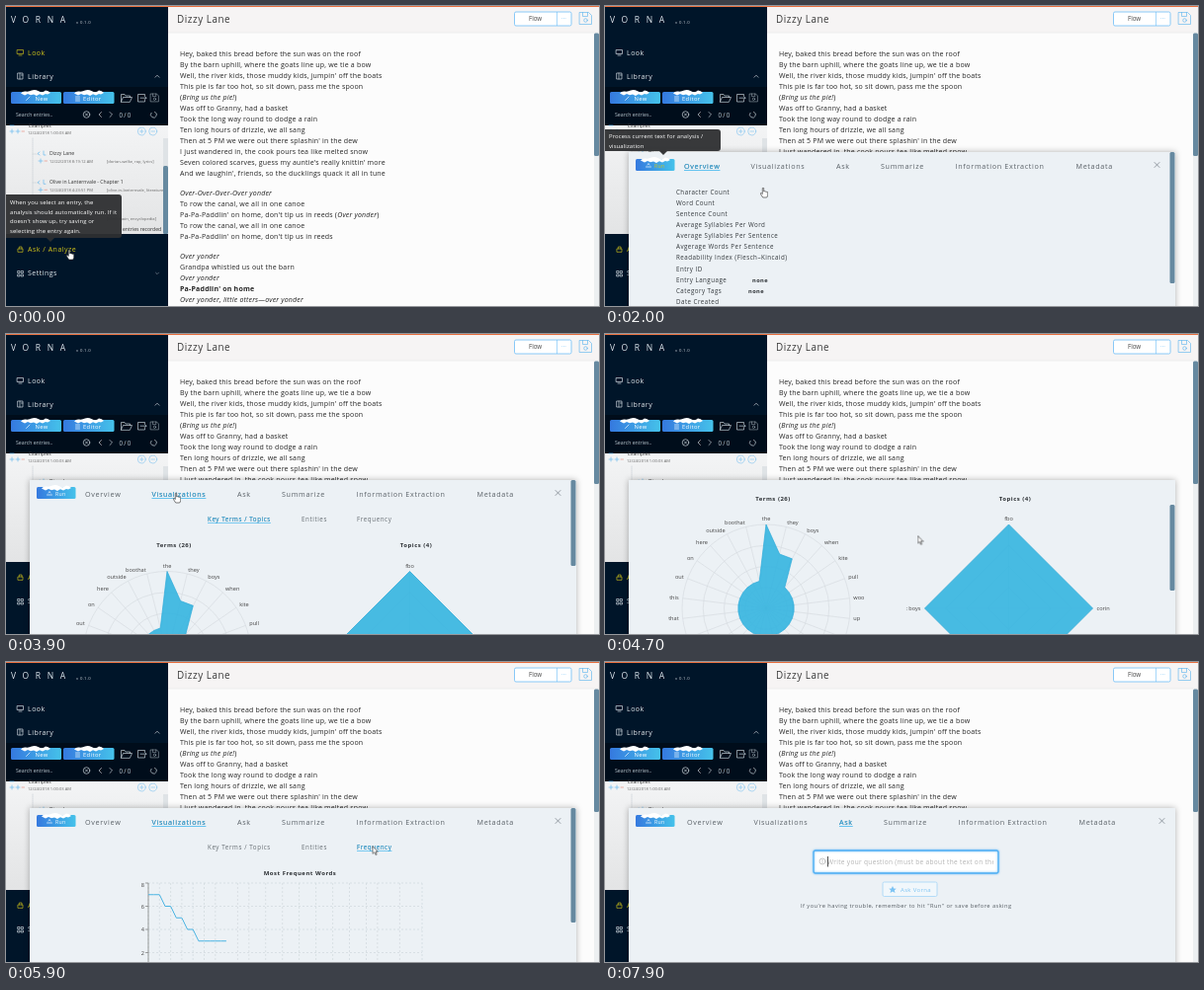
Animation of 600x304 px, one loop 8 s. Source, as an HTML page:

```html
<!DOCTYPE html>
<html lang="en">
<head>
<meta charset="utf-8">
<title>Text analysis demo</title>
<style>
html,body{margin:0;width:100%;height:100%;overflow:hidden;background:#fcfcfc}
svg{display:block;width:600px;height:304px;font-family:"Open Sans","Noto Sans",sans-serif}
text{white-space:pre}
.ln{fill:none;stroke-width:.65;stroke-linecap:round;stroke-linejoin:round}
.w{stroke:#d5dde4}.y{stroke:#d3c51a}.b{stroke:#62b6ef}.r{stroke:#e58a7a}
.menu{font-size:7px;letter-spacing:.5px;fill:#e6eaee}
.yel{fill:#d3c51a}
.lyr{font-size:7px;letter-spacing:.2px;fill:#242424}
.lyr .i{font-style:italic}
.lyr .s{font-weight:700}
.tab{font-size:7.2px;letter-spacing:.67px;fill:#5a6167}
.sub{font-size:6.2px;letter-spacing:.6px;fill:#666d73}
.act{fill:#2fb1ee;text-decoration:underline}
.row{font-size:6.2px;letter-spacing:.47px;fill:#33383c}
.val{font-size:5.7px;letter-spacing:.4px;font-weight:700;fill:#2c3034}
.head{font-size:6px;letter-spacing:.5px;font-weight:700;fill:#2c3034;text-anchor:middle}
.lab{font-size:5.6px;fill:#444}
.m{text-anchor:middle}.e{text-anchor:end}
.tree{font-size:5.1px;fill:#333}
.tiny{font-size:4.1px;fill:#666}
.tip path{fill:#2e2f31;fill-opacity:.95}
.tip g{font-size:5.9px;letter-spacing:.12px;fill:#fff}

/* one shared 8 s clock; 1% is 80 ms */
.a{animation:8s linear infinite both}
.look{animation-name:look}
.tip0{animation-name:tip0}
.tip1{animation-name:tip1}
.hot{animation-name:hot}
.draw{animation-name:draw}
.msg{animation-name:msg}
.none{animation-name:none-v}
.full{animation-name:full}
.over{animation-name:over}
.vis{animation-name:vis}
.ask{animation-name:ask}
.terms{animation-name:terms}
.ents{animation-name:ents}
.freq{animation-name:freq}
.dots{animation-name:dots}
.line{animation-name:line;stroke-dasharray:1}
.focus{animation-name:focus}
.scroll{animation-name:scroll}
.thumb{animation-name:thumb}
.nudge{animation-name:nudge}
.nudge2{animation-name:nudge2}
.move{animation-name:move;animation-timing-function:ease-in-out}
.hand{animation-name:hand}
.arrow{animation-name:arrow}
@keyframes look{0%,3.7%{fill:#d3c51a;stroke:#d3c51a}5%,100%{fill:#e6eaee;stroke:#e6eaee}}
@keyframes tip0{0%,6%{opacity:1}8.5%,100%{opacity:0}}
@keyframes tip1{0%,15%{opacity:0}17%,25.6%{opacity:1}27.5%,100%{opacity:0}}
@keyframes hot{0%,14.9%{fill:#fff}15%,25.6%{fill:#d3c51a}27%,100%{fill:#fff}}
@keyframes draw{0%,4.5%{transform:translateY(170px);animation-timing-function:cubic-bezier(.2,.6,.3,1)}8.75%,100%{transform:none}}
@keyframes msg{0%,26.2%{opacity:0}28.5%,38.75%{opacity:1}41.25%,100%{opacity:0}}
@keyframes none-v{0%,36.2%{opacity:1}36.21%,100%{opacity:0}}
@keyframes full{0%,36.2%{opacity:0}36.21%,100%{opacity:1}}
@keyframes over{0%,48.74%{opacity:1}48.75%,100%{opacity:0}}
@keyframes vis{0%,48.74%{opacity:0}48.75%,89.99%{opacity:1}90%,100%{opacity:0}}
@keyframes ask{0%,89.99%{opacity:0}90%,100%{opacity:1}}
@keyframes terms{0%,48.74%{opacity:0}48.75%,64.99%{opacity:1}65%,100%{opacity:0}}
@keyframes ents{0%,64.99%{opacity:0}65%,71.24%{opacity:1}71.25%,100%{opacity:0}}
@keyframes freq{0%,71.24%{opacity:0}71.25%,89.99%{opacity:1}90%,100%{opacity:0}}
@keyframes dots{0%,78.7%{opacity:0}78.8%,100%{opacity:1}}
@keyframes line{0%,71.25%{stroke-dashoffset:1}78.7%,100%{stroke-dashoffset:0}}
@keyframes focus{0%,95.5%{opacity:0}97%,100%{opacity:1}}
@keyframes scroll{0%,53.75%{transform:none}57.5%,61.25%{transform:translateY(-47.5px)}63.75%,76.25%{transform:none}79%,85%{transform:translateY(-55.5px)}87.5%,100%{transform:none}}
@keyframes thumb{0%,48.74%{y:148px;height:133px}48.75%,53.75%{y:148px;height:87px}57.5%,61.25%{y:173px;height:87px}63.75%,64.99%{y:148px;height:87px}65%,71.24%{y:148px;height:51px}71.25%,76.25%{y:148px;height:116px}79%,85%{y:188px;height:116px}87.5%,89.99%{y:148px;height:116px}90%,100%{y:148px;height:0}}
@keyframes nudge{0%,89.99%{transform:none}90%,100%{transform:translateX(3px)}}
@keyframes nudge2{0%,89.99%{transform:none}90%,100%{transform:translateX(5px)}}
@keyframes move{0%,5%{transform:translate(64px,247px)}13%,21.25%{transform:translate(50px,162px)}25%{transform:translate(160px,184px)}30%{transform:translate(200px,187px)}40%{transform:translate(225px,186px)}46.5%,49%{transform:translate(172px,161px)}54%,61%{transform:translate(316.5px,204.5px)}64%,67%{transform:translate(306.5px,181.5px)}70.5%,72%{transform:translate(368px,187px)}76%,86%{transform:translate(375.5px,186px)}89.5%,91.5%{transform:translate(241px,161px)}95.5%,100%{transform:translate(226px,202px)}}
@keyframes hand{0%,8%{opacity:1}8.01%,12%{opacity:0}12.01%,26%{opacity:1}26.01%,45.5%{opacity:0}45.51%,50%{opacity:1}50.01%,63.5%{opacity:0}63.51%,67.5%{opacity:1}67.51%,70%{opacity:0}70.01%,73%{opacity:1}73.01%,89%{opacity:0}89.01%,92%{opacity:1}92.01%,100%{opacity:0}}
@keyframes arrow{0%,8%{opacity:0}8.01%,12%{opacity:1}12.01%,26%{opacity:0}26.01%,45.5%{opacity:1}45.51%,50%{opacity:0}50.01%,63.5%{opacity:1}63.51%,67.5%{opacity:0}67.51%,70%{opacity:1}70.01%,73%{opacity:0}73.01%,89%{opacity:1}89.01%,92%{opacity:0}92.01%,95.5%{opacity:1}95.51%,100%{opacity:0}}
</style>
</head>
<body>
<svg viewBox="0 0 600 304">
<defs>
  <linearGradient id="btn"><stop offset="0" stop-color="#3579df"/><stop offset="1" stop-color="#45c2ea"/></linearGradient>
  <linearGradient id="pane" x2="0" y2="1"><stop offset="0" stop-color="#f3f4f5"/><stop offset="1" stop-color="#e3e4e5"/></linearGradient>
  <clipPath id="view"><path d="M24 148H577V304H24z"/></clipPath>
  <clipPath id="treeClip"><path d="M0 117H159V231H0z"/></clipPath>
  <clipPath id="inClip"><path d="M214 192H393V214H214z"/></clipPath>
  <g id="floppy"><path class="ln" d="M0 0H9L12 3V12H0zM3 0V4H8V0"/><circle class="ln" cx="6" cy="8" r="1.8"/></g>
  <path id="torn" fill="#fff" d="M0 3Q2 .5 5 1T11 0T18 .8T25 0Q28 0 30 2.5L27 4 25 3.4 22 5 19 3.8 16 5.4 13 4 10 4.8 7 3.6 4 5z"/>
</defs>

<!-- page -->
<path fill="#f6f4f4" d="M164 0H600V27H164z"/>
<path stroke="#e4e4e4" stroke-width=".6" d="M164 27H600"/>
<text x="173" y="17.3" font-size="9.9" letter-spacing=".55" fill="#3a3a3a">Dizzy Lane</text>
<rect x="514.5" y="6" width="57.5" height="14" rx="1.5" fill="#fff" stroke="#6cbdf6" stroke-width=".8"/>
<path stroke="#6cbdf6" stroke-width=".6" d="M557.5 6V20"/>
<text x="529" y="15.4" font-size="6.2" fill="#444">Flow</text>
<text x="562" y="14" font-size="6" fill="#6cbdf6">···</text>
<use href="#floppy" class="b" x="580.5" y="6.5"/>
<g id="lyrics" class="lyr"></g>
<path fill="#eceff1" d="M595 27.5H600V304H595z"/>
<rect x="595" y="27.5" width="5" height="124.5" rx="1.5" fill="#6689a0"/>
<g class="a msg">
  <rect x="257" y="5" width="86" height="19" rx="2.5" fill="#f3f3f3" stroke="#e3e3e3" stroke-width=".6"/>
  <circle cx="268" cy="14.5" r="2.7" fill="none" stroke="#888"/>
  <text x="276" y="17" font-size="6" letter-spacing=".1" fill="#777">Outputting analysis..</text>
</g>

<!-- sidebar -->
<path fill="#001529" d="M0 0H164V304H0z"/>
<path fill="#000d1b" d="M0 82H164V121H0z"/>
<text x="5" y="17.3" font-size="8.5" letter-spacing="6.6" fill="#e3eaf0">VORNA</text>
<text x="71" y="18" font-size="4.2" letter-spacing=".35" fill="#cfd6dc">v 0.1.0</text>
<g class="menu">
  <g class="a look">
    <path class="ln" d="M11.5 44.5H17.5V48.5H11.5zM13 50H16"/>
    <text x="22" y="49.6" stroke="none">Look</text>
  </g>
  <path class="ln w" d="M12 68H17V74H12zM14 68V74M15.5 70H17"/>
  <text x="22" y="73.6">Library</text>
  <path class="ln w" d="M151 72.2L153 70.2 155 72.2"/>
  <path class="ln y" d="M12.3 246H17V249.3H12.3zM13.3 246V244H16V246"/>
  <text class="yel" x="22" y="249.3">Ask / Analyze</text>
  <path class="ln w" d="M12 268.5H14V270.5H12zM15.5 268.5H17.5V270.5H15.5zM12 272H14V274H12zM15.5 272H17.5V274H15.5z"/>
  <text x="22" y="273.4">Settings</text>
  <path class="ln w" d="M151.5 270.2L153 271.7 154.5 270.2" opacity=".6"/>
</g>
<rect x="5" y="87" width="51" height="12" rx="1.5" fill="url(#btn)"/>
<rect x="58" y="87" width="51.5" height="12" rx="1.5" fill="url(#btn)"/>
<use href="#torn" x="15" y="85.5"/><use href="#torn" x="69" y="85.5"/>
<g fill="#fff" font-size="5.8" letter-spacing=".4">
  <text x="29.5" y="95.8">New</text><text x="78" y="95.8">Editor</text>
  <path class="ln" stroke="#fff" d="M20.5 95.5L24 92M70.5 92H74.5M70.5 94H74.5M70.5 96H74.5"/>
</g>
<path class="ln w" d="M116.5 97V89.5H120L121 91H125.5V92.5M116.5 97L118.5 92.5H127.5L125.5 97zM140.5 91V89.5H133.5V97H140.5V95.5M136 93.2H142M140.5 91.7L142 93.2 140.5 94.7"/>
<g class="w" transform="translate(146.5 89) scale(.66)"><use href="#floppy"/></g>
<text x="10" y="112.3" font-size="5.2" fill="#bcc6ce">Search entries..</text>
<g class="ln w"><circle cx="81.5" cy="110" r="3.3"/><path d="M80.3 108.8L82.7 111.2M82.7 108.8L80.3 111.2M96.5 107.5L94 110 96.5 112.5M105 107.5L107.5 110 105 112.5M147 108.3A3 3 0 1 0 150.5 107.3"/></g>
<text x="114.5" y="112.5" font-size="6.2" letter-spacing="1.2" fill="#c5ced5">0/0</text>

<!-- entry tree -->
<path fill="url(#pane)" d="M0 121H164V231H0z"/>
<g clip-path="url(#treeClip)">
  <path class="ln" stroke="#c6ced4" stroke-dasharray="1 1" d="M27 134V231M27 150H33M27 179H33M27 209H33"/>
  <text class="tree" x="23" y="122.5">Examples</text>
  <text class="tiny" x="22" y="129.7">12/24/2018 1:00:03 AM</text>
  <path class="ln b" d="M4 121H8M4 127H8M6 125V129M12 125V129M10 127H14"/>
  <path class="ln r" d="M16 127H18.5"/>
  <g id="entries"></g>
  <g class="ln b" opacity=".75"><circle cx="137.3" cy="127" r="4"/><circle cx="148.7" cy="127" r="4"/><path d="M135.5 127H139M137.3 125.2V128.8M147 127H150.5"/></g>
</g>
<path fill="#dfe3e6" d="M159 134H164V231H159z"/>
<rect x="159" y="162" width="5" height="69" rx="1.5" fill="#6689a0"/>
<g class="tip a tip0">
  <path d="M0 191H114Q117 191 117 194V232Q117 235 114 235H49L45 239 41 235H0z"/>
  <g id="tipA"></g>
</g>

<!-- drawer -->
<g class="a draw">
  <rect x="24" y="148" width="553" height="175" fill="#ecf1f5" style="filter:drop-shadow(0 0 3px rgba(0,0,0,.3))"/>
  <g clip-path="url(#view)">
    <g class="a scroll">
      <rect x="31" y="155" width="39.5" height="12" rx="1.5" fill="url(#btn)"/>
      <use href="#torn" x="36" y="153.5"/>
      <text class="a hot" x="50" y="163.5" font-size="5.2" letter-spacing=".3">Run</text>
      <path class="ln" stroke="#fff" d="M41.5 163H46.5M43 161L44 159.5 45 161"/>
      <g id="tabs" class="tab a nudge"></g>
      <path class="ln a nudge2" stroke="#66727a" d="M556 158.5L561 163.5M561 158.5L556 163.5"/>
      <g id="overview" class="a over"></g>
      <g id="subs" class="sub a vis"></g>
      <g id="terms" class="a terms"></g>
      <g id="ents" class="a ents"></g>
      <g id="freq" class="a freq"></g>
      <g class="a ask">
        <rect x="211" y="191" width="187" height="23" rx="2" fill="#fff" stroke="#a9d6f7"/>
        <rect class="a focus" x="211" y="191" width="187" height="23" rx="2" fill="none" stroke="#55b1f3" stroke-width="1.3" style="filter:drop-shadow(0 0 1px #6cbdf6)"/>
        <circle class="ln" stroke="#aaa" cx="220" cy="202" r="3"/>
        <path class="ln" stroke="#aaa" d="M220 200.5V202.3M220 203.5V203.6"/>
        <g clip-path="url(#inClip)"><text x="225" y="204.7" font-size="6.5" letter-spacing=".33" fill="#b3b3b3">Write your question (must be about the text on the page)</text></g>
        <path class="a focus" stroke="#222" stroke-width=".8" d="M225.5 197V207.5"/>
        <rect x="281" y="223" width="55" height="14.5" rx="1.5" fill="#f1f7fb" stroke="#a4d5f6" stroke-width=".8"/>
        <path fill="#7cc3f3" d="M291 227L292.2 229.5 294.8 229.7 292.8 231.3 293.5 234 291 232.6 288.5 234 289.2 231.3 287.2 229.7 289.8 229.5z"/>
        <text x="299" y="232.7" font-size="6" letter-spacing=".35" fill="#7cc3f3">Ask Vorna</text>
        <text x="198" y="249.4" font-size="5.7" letter-spacing=".46" fill="#555c62">If you're having trouble, remember to hit "Run" or save before asking</text>
      </g>
    </g>
    <rect class="a thumb" x="571.5" width="5" rx="1.5" fill="#6689a0"/>
  </g>
</g>
<g class="tip a tip1">
  <path d="M0 125H114Q117 125 117 128V144Q117 147 114 147H63L59 151 55 147H0z"/>
  <g id="tipB"></g>
</g>

<g class="a move" stroke="#222" stroke-width=".6" stroke-linejoin="round" fill="#fff">
  <path class="a arrow" d="M0 0V7.5L1.8 6 3 8.8 4.2 8.3 3 5.6H5.3z"/>
  <path class="a hand" d="M-.7 .6Q0-.4.7.6V4Q1.7 3.3 2.2 4.1 3.1 3.6 3.6 4.4 4.7 4.1 4.7 5.2V7.5Q4.5 9 3.7 10H-.3L-2.6 6.5Q-2.9 5.3-1.8 5.6L-.7 6.6z"/>
</g>
<path fill="#e8703f" d="M0 0H600V1H0z"/>
</svg>

<script>
const put = (id, html) => { document.getElementById(id).innerHTML = html; };
const txt = (x, y, s, cls = '') => `<text x="${x}" y="${y}" class="${cls}">${s}</text>`;
const lines = (x, y, step, list) => list.map((s, i) => txt(x, y + i * step, s)).join('');

// lyrics, in stanzas that start at a given height
const it = s => `<tspan class="i">${s}</tspan>`;
const row = "To row the canal, we all in one canoe";
const pad = "Pa-Pa-Paddlin' on home, don't tip us in reeds";
put('lyrics', [
  [50.8, [
    "Hey, baked this bread before the sun was on the roof",
    "By the barn uphill, where the goats line up, we tie a bow",
    "Well, the river kids, those muddy kids, jumpin' off the boats",
    "This pie is far too hot, so sit down, pass me the spoon",
    `(${it("Bring us the pie!")})`,
    "Was off to Granny, had a basket",
    "Took the long way round to dodge a rain",
    "Ten long hours of drizzle, we all sang",
    "Then at 5 PM we were out there splashin' in the dew",
    "I just wandered in, the cook pours tea like melted snow",
    "Seven colored scarves, guess my auntie's really knittin' more",
    "And we laughin', friends, so the ducklings quack it all in tune"]],
  [191.8, [it("Over-Over-Over-Over yonder"), row, `${pad} (${it("Over yonder")})`, row, pad]],
  [256.2, [it("Over yonder"), "Grandpa whistled us out the barn", it("Over yonder"),
    '<tspan class="s">Pa-Paddlin\' on home</tspan>', it("Over yonder, little otters—over yonder")]]
].map(([y, list]) => lines(176, y, 11.03, list)).join(''));

put('entries', [
  ['Dizzy Lane', '12/22/2018 8:19:12 AM', '[dorian-welke, rap, lyrics]'],
  ['Olive in Lanternvale - Chapter 1', '12/24/2018 4:23:51 PM', '[olive-in-lanternvale, literature]'],
  ['Blockchain', '12/24/2018 4:25:10 PM', '[blockchain, encyclopedia]']
].map(([name, date, tags], i) => {
  const y = 151 + i * 29.3;
  return txt(44, y, name, 'tree') + txt(44, y + 7.7, date, 'tiny') + txt(102, y + 7.7, tags, 'tiny') +
    `<path class="ln b" d="M34 ${y - 3}l-2 1.5 2 1.5M38 ${y - 4}v4h2M33 ${y + 6}h4m-2 -2v4"/>
     <path class="ln r" d="M39 ${y + 6}h2.5"/>`;
}).join('') + txt(118, 228, 'entries recorded', 'tree'));

put('tipA', lines(4, 201, 9.7, ['When you select an entry, the', 'analysis should automatically run. If it',
  "doesn't show up, try saving or", 'selecting the entry again.']));
put('tipB', lines(4, 134.3, 9.5, ['Process current text for analysis /', 'visualization']));

put('tabs', [[80, 'Overview', 'over'], [147.5, 'Visualizations', 'vis'], [234, 'Ask', 'ask'],
  [279, 'Summarize'], [354.5, 'Information Extraction'], [476.5, 'Metadata']]
  .map(([x, s, cls]) => txt(x, 165.3, s) + (cls ? txt(x, 165.3, s, 'act a ' + cls) : '')).join(''));
put('subs', [[204, 'Key Terms / Topics', 'terms'], [299, 'Entities', 'ents'], [355, 'Frequency', 'freq']]
  .map(([x, s, cls]) => txt(x, 190, s) + txt(x, 190, s, 'act a ' + cls)).join(''));

put('overview', [
  ['Character Count', 152, '2033'], ['Word Count', 138, '354'], ['Sentence Count', 150, '31'],
  ['Average Syllables Per Word', 189, '1.29'], ['Average Syllables Per Sentence', 201, '14.77'],
  ['Avgerage Words Per Sentence', 198, '11.42'],
  ['Readability Index (Flesch–Kincaid)', 211, '85.79 - Fairly easy to read (6th - 7th grade reading level)'],
  ['Entry ID', 125, '39b57226-d0e0-4188-8ace-5cfae8eb24ac'],
  ['Entry Language', 149, 'eng1', 'none'], ['Category Tags', 145, 'dorian-welke, rap, lyrics', 'none'],
  ['Date Created', 141, '12/22/2018 8:19:12 AM']
].map(([name, x, val, before], i) => {
  const y = 190.6 + i * 11.13;
  return txt(72, y, name, 'row') + txt(x, y, val, 'val a full') + (before ? txt(x, y, before, 'val a none') : '');
}).join(''));

// radar chart; values run from 0 to 1, clockwise from the top
function radar(cx, cy, vals, labels, round) {
  const R = 85, n = vals.length;
  const at = (i, r) => {
    const a = i / n * 2 * Math.PI;
    return [cx + r * Math.sin(a), cy - r * Math.cos(a)];
  };
  const poly = f => vals.map((v, i) => at(i, f(v)).map(k => k.toFixed(1))).join(' ');
  let s = '<g fill="none" stroke="#d3d9de" stroke-width=".6">';
  for (let k = 1; k <= 4; k++) {
    s += round ? `<circle cx="${cx}" cy="${cy}" r="${R * k / 4}"/>` : `<polygon points="${poly(() => R * k / 4)}"/>`;
  }
  vals.forEach((v, i) => { s += `<path d="M${cx} ${cy}L${at(i, R)}"/>`; });
  s += `</g><polygon points="${poly(v => v * R)}" fill="#30b3e0" fill-opacity=".88" stroke="#2ba9d8" stroke-width=".7"/>`;
  labels.forEach((name, i) => {
    if (!name) return;
    const [x, y] = at(i, R + 4);
    s += txt(x, y + (i ? 1.5 : 0), name, 'lab ' + (i === 0 ? 'm' : i > n / 2 ? 'e' : ''));
  });
  return s;
}

const words = 'the they boys when kite pull woo up'.split(' ');
words.push(...Array(11).fill(''), ...'that this out on here outside boothat'.split(' '));
put('terms', '<g transform="translate(0 47.5)">' +
  txt(170, 168.6, 'Terms (26)', 'head') + txt(415, 168.6, 'Topics (4)', 'head') +
  radar(163, 278, words.map((w, i) => [1, 2 / 3, 2 / 3][i] || 1 / 3), words, true) +
  radar(408.5, 278, [1, 1, 1, 1], ['fbo', 'corin', '', ': boys']) + '</g>');
put('ents', txt(170, 216, 'People (3)', 'head') + txt(415, 216, 'Places (0)', 'head') +
  radar(163, 326, [1, .72, .34], ['someone']));

// word frequencies as [value, run length]
const runs = [[7, 3], [6, 2], [5, 2], [4, 2], [3, 12], [2, 21], [1, 8]];
const counts = runs.flatMap(([v, n]) => Array(n).fill(v));
const px = i => +(144 + i * 277 / 49).toFixed(1), py = v => 262.5 - v * 11.75;
const ticks = { 0: 'I', 2: 'in', 4: 'my', 6: 'we', 8: 'me', 10: 'all', 12: 'ayy,', 16: 'shit', 18: 'us', 21: 'win',
  24: 'boys,', 27: 'hit', 30: 'man,', 33: 'that', 36: "don't", 39: "'til", 41: 'pull', 45: 'nice', 49: '(Nah,' };
let chart = txt(297.5, 160.5, 'Most Frequent Words', 'head');
let grid = '', marks = 'M144 168.5V262.5H421';
for (let v = 0; v <= 8; v += 2) {
  grid += `M144 ${py(v)}H421`;
  marks += `M141 ${py(v)}h3`;
  chart += txt(140, py(v) + (v === 8 ? 4 : 2), v, 'lab e');
}
for (const i in ticks) {
  grid += `M${px(i)} 168.5V262.5`;
  marks += `M${px(i)} 262.5v3`;
  chart += txt(px(i), 270.3, ticks[i], 'lab m');
}
chart += `<path d="${grid}" stroke="#ccd3d8" stroke-width=".6" stroke-dasharray="2 2"/>
  <path d="${marks}" fill="none" stroke="#777" stroke-width=".7"/>
  <polyline class="a line" pathLength="1" points="${counts.map((v, i) => [px(i), py(v)]).join(' ')}" fill="none" stroke="#4ab3e2"/>
  <g class="a dots" fill="#fff" stroke="#4ab3e2" stroke-width=".8">` +
  counts.map((v, i) => `<circle cx="${px(i)}" cy="${py(v)}" r="1.5"/>`).join('') + '</g>';
put('freq', `<g transform="translate(0 55.5)">${chart}</g>`);
</script>
</body>
</html>
```
